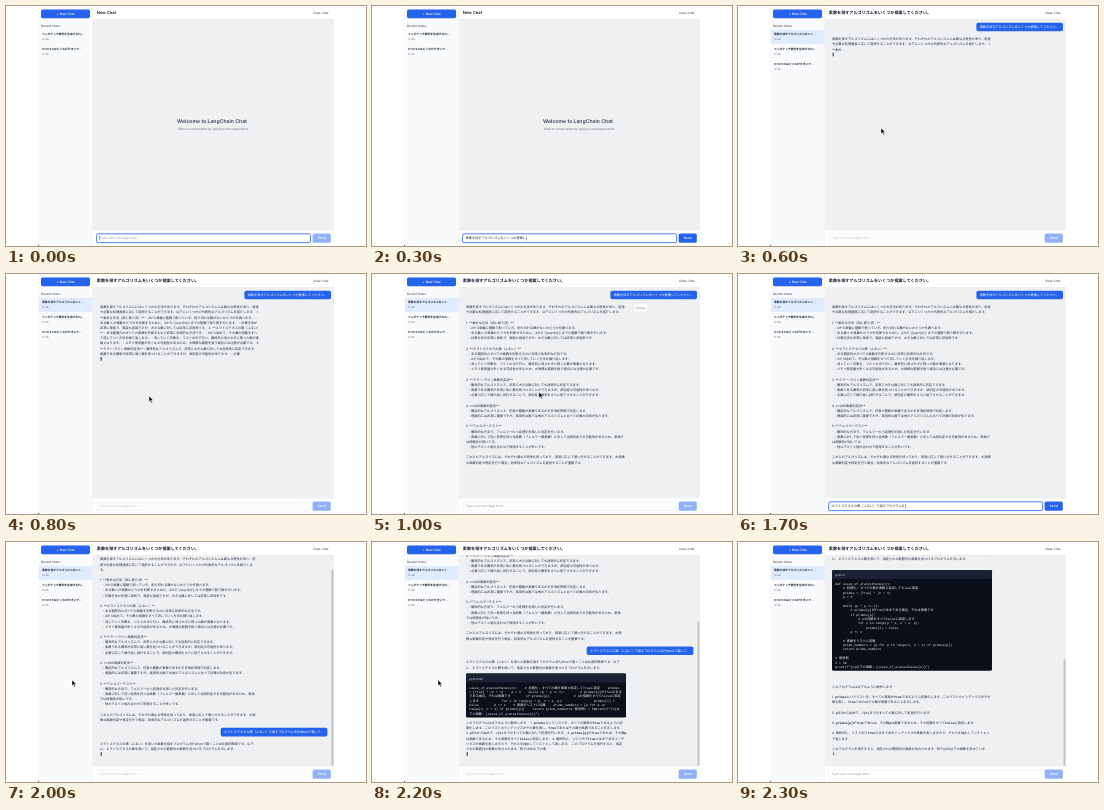
Recreate the animation shown at these times as an HTML page. Size 360 by 240 pixels, loop 2400 ms.

```html
<!DOCTYPE html>
<html lang="ja">
<head>
<meta charset="utf-8">
<title>Chat</title>
<style>
  html, body { margin: 0; width: 100%; height: 100%; overflow: hidden; background: #fff; }
  svg { display: block; width: 360px; height: 240px; }
  text { white-space: pre; text-rendering: geometricPrecision;
    font-family: Inter, "Noto Sans CJK JP", "Noto Sans CJK", sans-serif; }
  .mono { font-family: "Liberation Mono", "Noto Sans CJK JP", "Noto Sans CJK", monospace; }
</style>
</head>
<body>
<svg id="stage" viewBox="0 0 360 240"></svg>
<script>
const STEP = 100, STEPS = 24;
const SIZE = 3.2, LEAD = 5.18, CODE_LEAD = 4.36;
const LEFT = 94, WIDE = 161, NARROW = 157.5;
const BLUE = '#2563eb', INK = '#1f2937', GRAY = '#6b7280';
const stage = document.getElementById('stage');

const question1 = '素数を探すアルゴリズムをいくつか提案してください。';
const question2 = 'エラトステネスの篩（ふるい）で探すプログラムをPythonで書いて。';

const answer1 = String.raw`素数を探すアルゴリズムにはいくつかの方法があります。それぞれのアルゴリズムには異なる特性があり、用途や必要な処理速度に応じて選択することができます。以下にいくつかの代表的なアルゴリズムを紹介します。

1. **素朴な方法（試し割り法）**
   - 2から順番に整数で割っていき、割り切れる数がないかどうかを調べます。
   - ある数 n が素数かどうかを判断するために、2から \(\sqrt{n}\) までの整数で割り算を行います。
   - 計算方法が非常に単純で、実装も容易ですが、大きな数に対しては非常に非効率です。

2. **エラトステネスの篩（ふるい）**
   - ある範囲内のすべての素数を列挙するのに非常に効率的な方法です。
   - 2から始めて、その数の倍数をすべて消していく方法を繰り返します。
   - 消していく作業を、リストの中で行い、最終的に消されずに残った数が素数となります。
   - メモリ使用量が多くなる可能性があるため、大規模な範囲を扱う場合には注意が必要です。

3. **ミラー–ラビン素数判定法**
   - 確率的なアルゴリズムで、非常に大きな数に対しても効率的に判定できます。
   - 素数である確率が非常に高い数を見つけることができますが、誤判定の可能性があります。
   - 必要に応じて繰り返し試行することで、誤判定の確率をさらに低下させることができます。

4. **AKS素数判定法**
   - 確定的なアルゴリズムで、任意の整数が素数であるかを多項式時間で判定します。
   - 理論的には非常に重要ですが、実用的な面では他のアルゴリズムと比べて計算の効率が劣ります。

5. **フェルマーテスト**
   - 確率的な方法で、フェルマーの小定理を利用した判定を行います。
   - 素数に対して近い性質を持つ合成数（フェルマー擬素数）に対しては誤判定する可能性があるため、単独では信頼性が低いです。
   - 他のテストと組み合わせて使用することが多いです。

これらのアルゴリズムは、それぞれ異なる特性を持っており、用途に応じて使い分けることができます。大規模な素数判定や特定を行う場合、効率的なアルゴリズムを選択することが重要です。`;

const intro = 'エラトステネスの篩（ふるい）を用いた素数を探すプログラムをPythonで書くことは比較的簡単です。以下に、エラトステネスの篩を用いて、指定された範囲内の素数を見つけるプログラムを示します。';

const code = `def sieve_of_eratosthenes(n):
    # 初期化: すべての数を素数と仮定してTrueに設定
    primes = [True] * (n + 1)
    p = 2

    while (p * p <= n):
        # primes[p]がTrueのままである場合、それは素数です
        if primes[p]:
            # pの倍数をすべてFalseに設定します
            for i in range(p * p, n + 1, p):
                primes[i] = False
        p += 1

    # 素数をリストに収集
    prime_numbers = [p for p in range(2, n + 1) if primes[p]]
    return prime_numbers

# 使用例
n = 50
print(f"{n}以下の素数: {sieve_of_eratosthenes(n)}")`;

const outro = `このプログラムは以下のように動作します：

1. \`primes\`というリストを、すべての要素が\`True\`であるように初期化します。このリストのインデックスがその数を表し、\`True\`であればその数が素数であることを示します。

2. \`p\`を2から始めて、\`√(n)\`までのすべての数に対して処理を行います。

3. \`primes[p]\`が\`True\`であれば、その数\`p\`は素数であるため、その倍数をすべて\`False\`に設定します。

4. 最終的に、リスト内で\`True\`のままであるインデックスが素数を表しますので、それらを抽出してリストとして返します。

このプログラムを実行すると、指定された範囲内の素数が出力されます。例では50以下の素数を求めています。`;

const flat = s => s.replace(/\s+/g, ' ');
const flatCode = code.replace('def ', '').replace(/\n/g, '');

// text received so far, by step
const stream1 = { 5: 0, 6: 107, 7: 310, 8: 540, 9: 770 };
const codeStart = intro.length, outroStart = codeStart + flatCode.length;
const stream2 = { 19: 0, 20: codeStart, 21: codeStart + 330, 22: outroStart + flat(outro).length - 9 };
const typed1 = [0, 6, 12, 19, 25];
const typed2 = { 12: 1, 13: 5, 14: 9, 15: 14, 16: 18, 17: 23, 18: 34 };
const pointer = { 5: [143, 122], 6: [143, 122], 7: [143, 122], 8: [143, 122], 9: [150, 121], 10: [167, 118],
  11: [172, 229], 19: [66, 138], 20: [66, 138], 21: [66, 138], 22: [66, 138] };

const ruler = document.createElement('canvas').getContext('2d');
function measure(s, mono) {
  ruler.font = mono ? '100px "Liberation Mono", "Noto Sans CJK JP", "Noto Sans CJK", monospace'
    : '100px Inter, "Noto Sans CJK JP", "Noto Sans CJK", sans-serif';
  return ruler.measureText(s.replace(/`/g, '')).width * SIZE / 100;
}

function wrap(s, width, mono) {
  const lines = [];
  for (const para of s.split('\n')) {
    let line = '';
    for (const tok of para.match(/[!-~]+|./gu) || []) {
      if (measure(line + tok, mono) <= width) line += tok;
      else if (/[、。）]/.test(tok)) {
        lines.push(line.slice(0, -1));
        line = line.slice(-1) + tok;
      } else {
        lines.push(line);
        line = tok.trimStart();
      }
    }
    lines.push(line);
  }
  return lines;
}

const esc = s => s.replace(/&/g, '&amp;').replace(/</g, '&lt;');
const rich = s => esc(s).replace(/`([^`]*)`/g, '<tspan class="mono" font-weight="700">$1</tspan>');

// y is the middle of the line
function text(x, y, s, { size = SIZE, fill = INK, weight = 400, anchor = 'start', cls = '' } = {}) {
  return `<text x="${x}" y="${y + size * .37}" font-size="${size}" fill="${fill}" font-weight="${weight}" text-anchor="${anchor}" class="${cls}">${rich(s)}</text>`;
}
function box(x, y, w, h, fill, r = 0, extra = '') {
  return `<rect x="${x}" y="${y}" width="${w}" height="${h}" rx="${r}" fill="${fill}" ${extra}/>`;
}
const paragraph = (lines, y) => lines.map((s, i) => text(LEFT, y + i * LEAD, s)).join('');
const caret = y => box(LEFT + .6, y - 1.8, 1.3, 3.6, '#4b5563');

function bubble(right, y, s) {
  const w = measure(s) + 6.6;
  return box(right - w, y - 4.3, w, 8.6, BLUE, 1.8) +
    text(right - w + 3.3, y, s, { fill: '#fff', weight: 500 });
}

function codeBlock(top, name, lines) {
  const height = 18 + (lines.length - 1) * CODE_LEAD;
  const body = lines.map((s, i) =>
    text(LEFT + 3.3, top + 14 + i * CODE_LEAD, s, { fill: '#f3f4f6', cls: 'mono' })).join('');
  return { bottom: top + height, svg: box(LEFT, top, 160, height, '#0b0f1a', 1.4) +
    box(LEFT, top, 160, 9, '#1a2130', 1.4) + text(LEFT + 3.3, top + 5, name, { size: 2.9, fill: '#d1d5db' }) + body };
}

function secondAnswer(k, y) {
  const got = stream2[k], live = got !== undefined;
  const head = wrap(live ? intro.slice(0, got) : intro, NARROW).filter(Boolean);
  let svg = paragraph(head, y);
  y += head.length * LEAD;
  if (live && got > codeStart) {
    const block = codeBlock(y + .8, 'pythondef', wrap(flatCode.slice(0, got - codeStart), 153.5, true));
    svg += block.svg;
    y = block.bottom + 5.3;
    if (got > outroStart) {
      const tail = wrap(flat(outro).slice(0, got - outroStart), NARROW + 1);
      svg += paragraph(tail, y);
      y += tail.length * LEAD;
    }
  }
  if (live) return { svg: svg + caret(y), last: y };
  const block = codeBlock(y + 5.8, 'python', code.split('\n'));
  const tail = wrap(outro, NARROW + 1);
  y = block.bottom + 15.9;
  return { svg: svg + block.svg + paragraph(tail, y), last: y + (tail.length - 1) * LEAD };
}

function chat(k) {
  if (k < 5) {
    return text(206, 115.2, 'Welcome to LangChain Chat', { size: 5.12, weight: 600, anchor: 'middle', fill: '#374151' }) +
      text(207.5, 123, 'Start a conversation by typing a message below.', { size: 3.12, anchor: 'middle', fill: GRAY });
  }
  const late = k >= 19;
  let svg = bubble(late ? 321.4 : 325, 21, question1);
  const got = stream1[k];
  const lines = wrap(got === undefined ? answer1 : flat(answer1).slice(0, got), late ? NARROW : WIDE).filter((s, i) => s || i);
  svg += paragraph(lines, 33);
  if (got !== undefined) svg += caret(33 + lines.length * LEAD);
  if (k === 10) {
    svg += box(262, 30, 13.4, 8, '#fff', 1.4, 'stroke="#d1d5db" stroke-width=".3"') +
      box(263.9, 32.9, 1.7, 2, 'none', .3, `stroke="${GRAY}" stroke-width=".3"`) +
      text(266.6, 34, 'Copy', { size: 2.7, fill: '#4b5563' });
  }
  if (!late) return svg;

  const end = 33 + (lines.length - 1) * LEAD;
  const reply = secondAnswer(k, end + 23.9);
  const scroll = Math.max(0, reply.last - 212);
  svg += bubble(321.4, end + 12.4, question2) + reply.svg;
  svg = `<g transform="translate(0 ${-scroll})">${svg}</g>`;
  if (scroll) {
    const view = 211, ratio = view / (view + scroll);
    svg += box(325.5, 13 + scroll * ratio, 2, view * ratio, '#c1c3c7', 1);
  }
  return svg;
}

function sidebar(k) {
  const items = [['フィボナッチ数列を生成するPy...', '10:46'], ['9.11と9.9はどっちが大きいで...', '10:45']];
  const started = k >= 5;
  if (started) items.unshift(['素数を探すアルゴリズムをいく...', '10:48']);
  return box(32, 0, 55, 240, '#f9fafb') + box(86.8, 0, .3, 240, '#e1e4e8') +
    box(35, 3.4, 49, 8.8, BLUE, 1.6) +
    text(59.7, 7.8, '+ New Chat', { fill: '#fff', weight: 500, anchor: 'middle' }) +
    text(35, 19.6, 'Recent Chats', { size: 3, weight: 500, fill: '#4b5563' }) +
    (started ? box(33, 23.8, 53.6, 14.2, '#e0ecfe') : '') +
    items.map(([title, time], i) => text(36, 28.3 + i * 15, title, { size: 2.8, weight: 600 }) +
      text(36, 32.6 + i * 15, time, { size: 2.6, fill: GRAY })).join('') +
    '<circle cx="32.5" cy="239.5" r=".6" fill="#333"/>';
}

function header(k) {
  return box(87, 0, 241, 13, '#fff') + box(87, 13, 241, .3, '#e1e4e8') +
    text(90.8, 6.7, k < 5 ? 'New Chat' : question1, { size: 4.11, weight: 600, fill: '#111827' }) +
    text(307, 6.7, 'Clear Chat', { size: 3.1, fill: '#374151' });
}

function footer(k) {
  const count = k < 5 ? typed1[k] : typed2[k] || 0;
  const value = (k < 5 ? question1 : question2).slice(0, count);
  const focus = k < 5 || (k > 10 && k < 19);
  const busy = k in stream1 || k in stream2;
  const stroke = focus ? `stroke="${BLUE}" stroke-width=".8"` : `stroke="${busy ? '#eceef1' : '#d5d9df'}" stroke-width=".35"`;
  let svg = box(87, 224, 241, 16, '#fff') + box(87, 224, 241, .3, '#e1e4e8') +
    box(90.6, 227.8, 214, 8.8, busy ? '#fcfcfd' : '#fff', 1.5, stroke) +
    (value ? text(93.6, 232.3, value) :
      text(93.6, 232.3, 'Type your message here...', { fill: busy ? '#c4c8ce' : '#8f96a1' }));
  if (focus) svg += box(93.5 + measure(value), 230.1, .4, 4.4, INK);
  return svg + box(306.6, 227.6, 18.2, 9.2, count ? BLUE : '#92b1f5', 1.6) +
    text(315.7, 232.3, 'Send', { fill: '#fff', weight: 500, anchor: 'middle' });
}

function arrow(k) {
  if (!pointer[k]) return '';
  const [x, y] = pointer[k];
  return `<path transform="translate(${x} ${y})" d="M0 0V5.8L1.4 4.5L2.4 6.9L3.4 6.5L2.4 4.2H4.2Z" fill="#000" stroke="#fff" stroke-width=".45"/>`;
}

function draw(k) {
  stage.innerHTML = box(87, 13, 241, 211, '#eff0f2') + chat(k) + header(k) + footer(k) + sidebar(k) + arrow(k);
}

let shown = -1;
function tick() {
  const k = Math.floor(performance.now() / STEP) % STEPS;
  if (k !== shown) draw(shown = k);
  requestAnimationFrame(tick);
}
tick();
</script>
</body>
</html>
```
